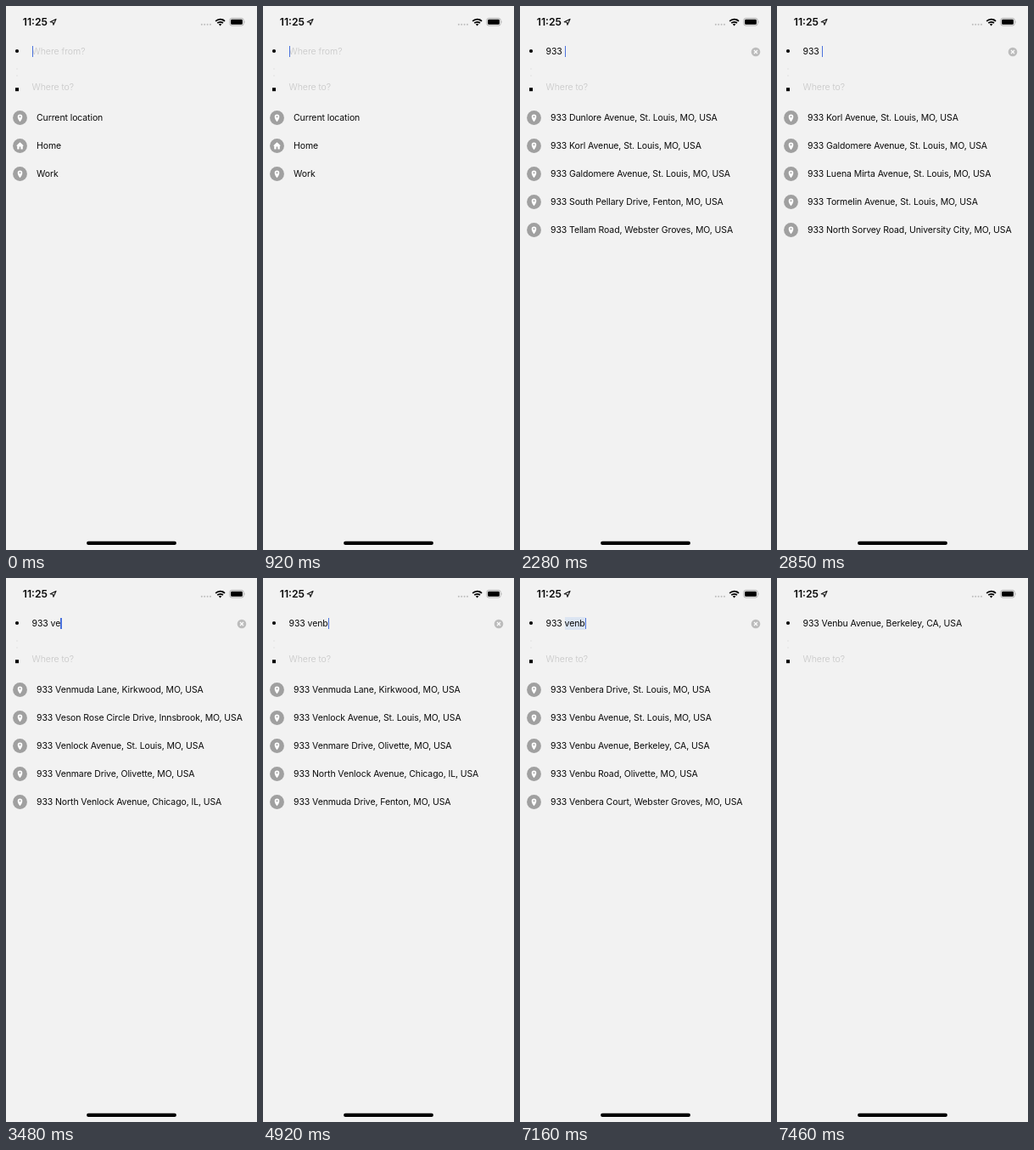
Write an HTML page that moves like this. It is 296 px wide and 640 px high and loops after 8 s.

```html
<!DOCTYPE html>
<html lang="en">
<head>
<meta charset="utf-8">
<title>Address search</title>
<style>
html, body { margin: 0; width: 100%; height: 100%; overflow: hidden; background: #f2f2f2; }
body { position: relative; font: 10.5px/20px Inter, "Liberation Sans", sans-serif; letter-spacing: -.1px; color: #0a0a0a; }
svg, .line { position: absolute; }
#frame { left: 0; top: 0; }
.line { left: 30.5px; white-space: pre; }
.hint { color: #c6c6c6; font-weight: 300; letter-spacing: 0; }
#time { left: 19.8px; top: 9px; font-size: 12.2px; font-weight: 600; letter-spacing: 0; }
#caret { display: inline-block; width: 1.6px; height: 13px; vertical-align: -3px; background: #4a71dc; }
mark { background: #dce5f2; color: inherit; padding: 1px 0; }
.row { position: absolute; left: 36px; white-space: pre; }
.row svg { left: -28.5px; top: .8px; }
</style>
</head>
<body>
<svg id="frame" width="296" height="640">
  <path d="M52.2 18.7 59 15.4 55.9 22.2 55.4 19.2Z" fill="none" stroke="#111" stroke-width="1.1" stroke-linejoin="round"/>
  <g fill="#bdbdbd">
    <circle cx="230.8" cy="21.7" r="1"/><circle cx="234.2" cy="21.7" r="1"/>
    <circle cx="237.6" cy="21.7" r="1"/><circle cx="241" cy="21.7" r="1"/>
  </g>
  <g fill="none" stroke="#000" stroke-width="1.8">
    <path d="M247.2 17.9a7.6 7.6 0 0 1 10.8 0"/>
    <path d="M249.3 20.2a4.6 4.6 0 0 1 6.6 0"/>
  </g>
  <path d="M252.6 23.4 250.9 21.6a2.4 2.4 0 0 1 3.4 0Z"/>
  <rect x="263.8" y="14.4" width="16.4" height="8.6" rx="2.4" fill="none" stroke="#a3a3a3" stroke-width=".8"/>
  <rect x="265.1" y="15.7" width="13.8" height="6" rx="1.3"/>
  <path d="M281.1 17.2q1.2 1.5 0 3Z" fill="#a3a3a3"/>
  <circle cx="13" cy="53" r="2.1"/>
  <rect x="11" y="96.2" width="4" height="4"/>
  <g fill="#dedede"><circle cx="13" cy="74" r=".8"/><circle cx="13" cy="82" r=".8"/></g>
  <g id="clear">
    <circle cx="278" cy="54" r="5.3" fill="#bcbcbc"/>
    <path d="m276 52 4 4m0-4-4 4" stroke="#fff" stroke-width="1.1"/>
  </g>
  <rect x="95.1" y="629.8" width="105.8" height="4.1" rx="2"/>
</svg>
<div class="line" id="time">11:25</div>
<div class="line hint" id="from" style="top:44px">Where from?</div>
<div class="line hint" style="top:86px">Where to?</div>
<div class="line" style="top:44px"><span id="text"></span><span id="caret"></span></div>
<div id="list"></div>
<script>
const $ = id => document.getElementById(id);
const LOOP = 8000;
const STL = ', St. Louis, MO, USA';
const PICK = '933 Venbu Avenue, Berkeley, CA, USA';

const places = ['Current location', 'Home', 'Work'];
const for9 = ['915 North Ormun Boulevard' + STL, '920 South Belvor Avenue' + STL,
  '915 North Belvor Avenue' + STL, '9 North Fensil Avenue' + STL, '911 Harmondelle Avenue' + STL];
const for93 = ['930 Tellam Avenue' + STL, '938 North Ormun Boulevard' + STL,
  '931 Quillane Street' + STL, '935 South Fensil Avenue' + STL, '939 Dunlore Avenue' + STL];
const for933 = ['933 Dunlore Avenue' + STL, '933 Korl Avenue' + STL, '933 Galdomere Avenue' + STL,
  '933 South Pellary Drive, Fenton, MO, USA', '933 Tellam Road, Webster Groves, MO, USA'];
const forSpace = ['933 Korl Avenue' + STL, '933 Galdomere Avenue' + STL, '933 Luena Mirta Avenue' + STL,
  '933 Tormelin Avenue' + STL, '933 North Sorvey Road, University City, MO, USA'];
const lane = '933 Venmuda Lane, Kirkwood, MO, USA';
const shared = ['933 Venlock Avenue' + STL, '933 Venmare Drive, Olivette, MO, USA',
  '933 North Venlock Avenue, Chicago, IL, USA'];
const forVe = [lane, '933 Veson Rose Circle Drive, Innsbrook, MO, USA', ...shared];
const forVen = [lane, ...shared, '933 Venmuda Drive, Fenton, MO, USA'];
const forVenb = ['933 Venbera Drive' + STL, '933 Venbu Avenue' + STL, PICK,
  '933 Venbu Road, Olivette, MO, USA', '933 Venbera Court, Webster Groves, MO, USA'];

// Each track is a series of [start time, value] steps.
const typing = [[0, ''], [1410, '9'], [1800, '93'], [1950, '933'], [2280, '933 '], [3000, '933 v'],
  [3370, '933 ve'], [4080, '933 ven'], [4920, '933 venb'], [5230, '933 <mark>venb</mark>'], [7300, PICK]];
const results = [[0, places], [1520, for9], [2070, for93], [2280, for933], [2850, forSpace],
  [3480, forVe], [4200, forVen], [5040, forVenb], [7460, []]];
const blink = [[0, 1], [450, .5], [560, 0], [800, .5], [920, 1], [3960, .5], [4080, 1],
  [4690, .5], [4800, 0], [4920, 1], [5650, 0], [5890, .5], [6010, 1], [6550, .8], [6660, 0],
  [6900, .5], [7020, 1], [7300, 0]];

const at = (track, t) => track.findLast(step => step[0] <= t)[1];

const pin = '<path fill="#fff" fill-rule="evenodd" d="M8.5 13.2C6.8 10.8 5.7 9.2 5.7 7.4a2.8 2.8 0 0 1 5.6 0C11.3 9.2 10.2 10.8 8.5 13.2ZM7.5 7.3a1 1 0 1 0 2 0a1 1 0 1 0-2 0Z"/>';
const house = '<path fill="#fff" d="M8.5 4.3 13 8.4H11.8V12.4H9.4V9.6H7.6V12.4H5.2V8.4H4Z"/>';
const row = (label, i) => `<div class="row" style="top:${122 + 33 * i}px"><svg width="17" height="17">
  <circle cx="8.5" cy="8.5" r="8.4" fill="#a0a0a0"/>${label === 'Home' ? house : pin}</svg>${label}</div>`;

let shownText, shownList;
function draw() {
  const t = performance.now() % LOOP;
  const text = at(typing, t), list = at(results, t);
  if (text !== shownText) {
    $('text').innerHTML = shownText = text;
    $('from').style.display = text ? 'none' : '';
    $('clear').style.display = text && text !== PICK ? '' : 'none';
  }
  if (list !== shownList) {
    shownList = list;
    $('list').innerHTML = list.map(row).join('');
  }
  $('caret').style.opacity = at(blink, t);
  requestAnimationFrame(draw);
}
draw();
</script>
</body>
</html>
```
